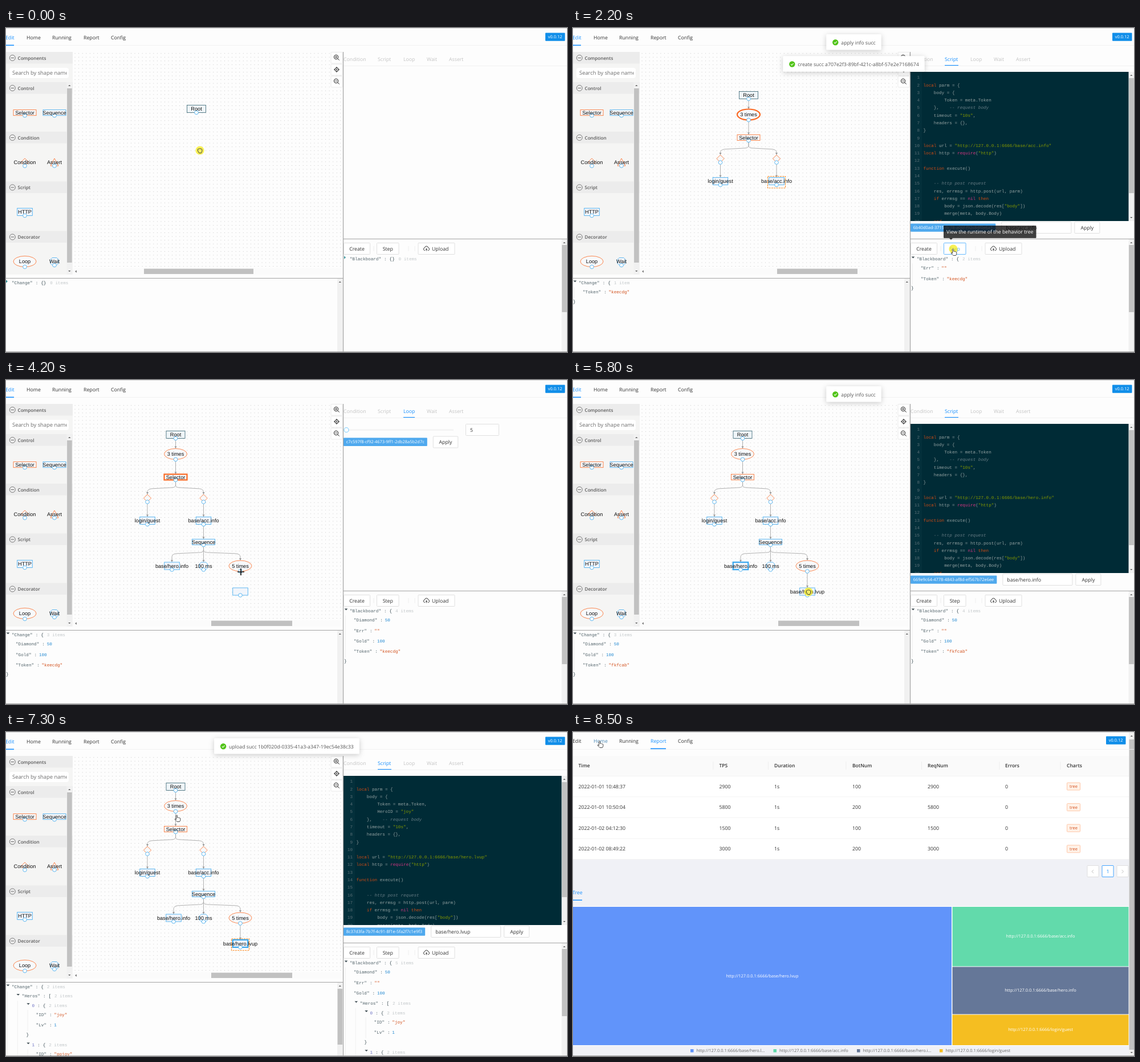
Recreate the animation shown at these times as an HTML page. Size 984 by 569 pixels, loop 9500 ms.

```html
<!DOCTYPE html>
<html lang="en">
<head>
<meta charset="utf-8">
<title>Behavior tree editor</title>
<style>
html, body { margin: 0; width: 100%; height: 100%; overflow: hidden; background: #fdfdfd; }
#stage { display: block; width: 984px; height: 569px; fill: #333; font: 8.75px 'Open Sans', 'Noto Sans', sans-serif; text-rendering: geometricPrecision; }
text { white-space: pre; }
.mono { font: 7.65px 'Liberation Mono', monospace; }
.node { font: 9.2px 'Liberation Sans', sans-serif; text-anchor: middle; fill: #111; }
.mid { text-anchor: middle; }
.small { font-size: 7.45px; }
.head { font-weight: 600; font-size: 8.5px; }
.side { font-weight: 600; font-size: 8.1px; fill: #5c5c5c; }
</style>
</head>
<body>
<svg id="stage" viewBox="0 0 984 569"></svg>
<script>
const LOOP = 9500, STEP = 100, LAST = 8500;
const BLUE = '#1890ff', SKY = '#3aa7ee', ORANGE = '#fb6a24', GRAY = '#c1c1c1', PALE = '#f1f1f1', EDGE = '#d9d9d9';
const stage = document.getElementById('stage');
const ruler = document.createElement('canvas').getContext('2d');

// Drawing helpers
const tag = (name, attrs, body = '') =>
  `<${name} ${Object.entries(attrs).map(([k, v]) => `${k}="${v}"`).join(' ')}>${body}</${name}>`;
const rect = (x, y, width, height, fill, more) => tag('rect', { x, y, width, height, fill, ...more });
const path = (d, stroke, w = 1, more) => tag('path', { d, fill: 'none', stroke, 'stroke-width': w, ...more });
const solid = (d, fill) => tag('path', { d, fill });
const circle = (cx, cy, r, fill, stroke = 'none', w = 1) => tag('circle', { cx, cy, r, fill, stroke, 'stroke-width': w });
const text = (x, y, body, more) => tag('text', { x, y, dy: '.35em', ...more }, body);
const clip = (x, y, width, height, body) => tag('svg', { x, y, width, height, viewBox: `${x} ${y} ${width} ${height}` }, body);
const box = (x, y, w, h, stroke = EDGE, fill = '#fff') => rect(x + .5, y + .5, w - 1, h - 1, fill, { stroke, 'stroke-width': .8, rx: 1 });
const button = (x, y, w, label, hot) =>
  box(x, y, w, 21, hot ? '#40a9ff' : EDGE) + text(x + w / 2, y + 10.5, label, { class: 'mid', fill: hot ? '#40a9ff' : '#333' });
const measure = (s, size) => {
  ruler.font = `${size}px 'Open Sans', 'Noto Sans', sans-serif`;
  return ruler.measureText(s).width;
};
const triangle = (x, y, dir, r = 2.2, fill = '#555') => {
  const turn = { up: 0, right: 90, down: 180, left: 270 }[dir];
  return tag('path', { d: `M${-r} ${r / 2}L0 ${-r / 2}L${r} ${r / 2}z`, fill, transform: `translate(${x} ${y}) rotate(${turn})` });
};
const vbar = (x, y, h, from, size, down) =>
  rect(x, y, 9.7, h, PALE) + triangle(x + 4.8, y + 6, 'up') +
  (size ? rect(x + .6, from, 8.6, size, GRAY) : '') + (down ? triangle(x + 4.8, y + h - 6, 'down') : '');

// Behavior tree: [kind, x, y, label, parent, appears at, linked at]
const NODES = {
  root: ['root', 297.5, 96, 'Root', '', 0, 0],
  loop: ['loop', 297.5, 130, '3 times', 'root', 400, 600],
  sel: ['selector', 297.5, 170.5, 'Selector', 'loop', 800, 900],
  c1: ['condition', 248, 207.5, '', 'sel', 1000, 1100],
  c2: ['condition', 346.5, 207.5, '', 'sel', 1100, 1200],
  login: ['http', 248, 247, 'login/guest', 'c1', 1300, 1500],
  acc: ['http', 346.5, 247, 'base/acc.info', 'c2', 1600, 1800],
  seq: ['sequence', 346.5, 284.5, 'Sequence', 'acc', 3200, 3300],
  hero: ['http', 291, 326.5, 'base/hero.info', 'seq', 3400, 3500],
  wait: ['wait', 346.5, 326.5, '100 ms', 'seq', 3600, 3700],
  again: ['loop', 411, 326.5, '5 times', 'seq', 3800, 3900],
  lvup: ['http', 411, 371.5, 'base/hero.lvup', 'again', 4200, 4300]
};
const HALF = { root: 6.5, loop: 9.5, selector: 5, sequence: 5, condition: 6.6, assert: 6.5, http: 6.5, wait: 6.5 };

function shape(kind, x, y, weight = .8) {
  const h = HALF[kind];
  const look = (color, fill = '#f7f9fc') => ({ fill, stroke: color, 'stroke-width': weight });
  const bar = (w, color, fill) => tag('rect', { x: x - w / 2, y: y - h, width: w, height: 2 * h, ...look(color, fill) });
  const poly = (d, color) => tag('path', { d: `M${x} ${y}${d}z`, ...look(color) });
  const body = {
    root: () => bar(33, '#32606f', '#eff5f8'),
    loop: () => tag('ellipse', { cx: x, cy: y, rx: 20, ry: h, ...look(ORANGE) }),
    selector: () => bar(40, ORANGE),
    sequence: () => bar(40, SKY),
    http: () => bar(26.5, SKY, '#f1f5fb'),
    condition: () => poly('m0-6.6l6.600 6.600l-6.600 6.600l-6.600-6.600', ORANGE),
    assert: () => poly('m0-6.5l7 13h-14', ORANGE),
    wait: () => poly('m-4-6.5h8l3 3v7l-3 3h-8l-3-3v-7', SKY)
  }[kind]();
  return body + circle(x, y + h, 3.3, '#fff', SKY, .8);
}

function link(a, b) {
  const [x, y] = [a[1], a[2] + HALF[a[0]] + 3.4], [u, v] = [b[1], b[2] - HALF[b[0]]];
  const head = solid(`M${u} ${v}l-2-4h4z`, '#999');
  if (x === u) return path(`M${x} ${y}V${v - 2}`, '#a8a8a8', .9) + head;
  const side = Math.sign(u - x), bend = y + 10;
  return path(`M${x} ${y}V${bend - 5}Q${x} ${bend} ${x + 6 * side} ${bend}L${u - 7 * side} ${bend + 2}Q${u} ${bend + 3} ${u} ${bend + 8}V${v - 2}`, '#a8a8a8', .9) + head;
}

function graph(t, s) {
  const live = Object.entries(NODES).filter(([, n]) => t >= n[5])
    .map(([id, n]) => [id, id === 'hero' && t >= 5000 ? n.with(1, 294) : n]);
  const edges = live.filter(([, n]) => n[4] && t >= n[6]).map(([, n]) => link(NODES[n[4]], n)).join('');
  const nodes = live.map(([id, n]) => {
    const [kind, x, y, label, , , done] = n;
    return shape(kind, x, y, s.hot === id ? 2.2 : .8) +
      (t >= done ? text(x, y, label, { class: 'node' }) : '') +
      (s.sel === id ? path(`M${x - 15.5} ${y - 8.5}h31v20.500h-31z`, '#fb8d28', 1.2, { 'stroke-dasharray': '3 1.3' }) : '');
  }).join('');
  return tag('g', { transform: `translate(${s.pan})` }, edges + nodes);
}

// Collapsible JSON view
function json(x, y, title, data) {
  const W = 4.59, IN = 17.8, TALL = 18.3;
  let out = '';
  const put = (px, s, fill, more) => { out += text(px, y, s, { class: 'mono', fill, ...more }); };
  const walk = (key, val, depth) => {
    const nested = typeof val === 'object', left = x + depth * IN + (nested ? 10 : -.8);
    const name = Number.isInteger(key) ? `${key}` : `"${key}"`, end = left + name.length * W;
    put(left, name, Number.isInteger(key) ? '#6c71c4' : '#52636a');
    put(end + 5, ':', '#52636a');
    if (!nested) {
      put(end + 13.4, typeof val === 'string' ? `"${val}"` : val, typeof val === 'string' ? '#d2521e' : '#268bd2');
      y += TALL;
      return;
    }
    const keys = Object.keys(val), list = Array.isArray(val), count = keys.length;
    put(end + 14.5, count ? '{['[+list] : '{}', '#2d4148');
    put(end + (count ? 25 : 30.5), `${count} item${count === 1 ? '' : 's'}`, '#c3c8ca', { 'font-style': 'italic' });
    out += triangle(x + depth * IN + (count ? 3.5 : 1.5), y - 2.5, count ? 'down' : 'right', 2.8, count ? '#3c4a50' : '#2a8b93');
    if (!count) return;
    const top = y + 8;
    y += TALL - 2;
    keys.forEach(k => walk(list ? +k : k, val[k], depth + 1));
    y -= 2;
    out += path(`M${x + depth * IN + 2.5} ${top}V${y - 6}`, '#eee', .8);
    put(x + depth * IN, '}]'[+list], '#2d4148');
    y += TALL;
  };
  walk(title, data, 0);
  return out;
}

// Script panel
const INK = ['#657b83', '#859900', '#cb4b16', '#d33682'];
const paint = line => line.replace(/(--.*)|("[^"]*")|\b(local|function|if|then|end)\b|\b(require|nil)\b/g, (m, ...g) => {
  const i = g.findIndex((v, n) => n < 4 && v);
  return `<tspan fill="${INK[i]}"${i ? '' : ' font-style="italic"'}>${m}</tspan>`;
});
const script = route => ['', 'local parm = {', '    body = {',
  ...(route.endsWith('lvup') ? ['        Token = meta.Token,', '        HeroID = "joy"'] : ['        Token = meta.Token']),
  '    },    -- request body', '    timeout = "10s",', '    headers = {},', '}', '',
  `local url = "http://127.0.0.1:6666/${route}"`, 'local http = require("http")', '', 'function execute()', '',
  '    -- http post request', '    res, errmsg = http.post(url, parm)', '    if errmsg == nil then',
  '        body = json.decode(res["body"])', '        merge(meta, body.Body)', '    end'];

const idTag = (y, id) => {
  const w = measure(id, 7.45) + 9.8;
  return [592 + w, rect(592, y, w, 14.3, '#4fa9ee', { rx: 1 }) + text(596.7, y + 7.2, id, { class: 'small', fill: '#fff' })];
};

function editor(s) {
  const rows = script(s.route).slice(0, 20).map((line, i) => {
    const y = 86.7 + i * 13.28;
    return text(608, y, i + 1, { class: 'mono', fill: '#586e75', 'text-anchor': 'end' }) +
      text(614.5, y, paint(line), { class: 'mono', fill: '#93a1a1' });
  }).join('');
  const [end, label] = idTag(343.5, s.id);
  return vbar(974.5, 77, 262, 88, 202, true) +
    clip(592, 77, 382.5, 262, rect(592, 77, 383, 262, '#002b36') + rect(592, 77, 20, 262, '#04303b') + rows) + label +
    box(end + 10, 340, 123, 21) + text(end + 18, 350.5, s.route) + button(end + 138, 340, 45, 'Apply');
}

function slider(s) {
  const [end, label] = idTag(101.6, s.id);
  return rect(597, 86.5, 188, 2.5, '#f3f3f3') + circle(597, 87.7, 4, '#fff', '#91d5ff', 1.3) +
    box(806, 77, 59, 21) + text(814, 88, s.value) + label + button(end + 10, 98.5, 44.5, 'Apply');
}

// Page frame
const NAV = { Edit: [-1, 15], Home: [36, 24], Running: [81, 34], Report: [136, 27], Config: [184, 27] };
function header(s, up = 0, badge = 946) {
  const [ix, iw] = s.ink || NAV[s.page];
  return rect(0, 0, 984, 1, '#dcdcdc') + rect(0, 30, 984, .8, '#f0f0f0') +
    Object.entries(NAV).map(([name, [x]]) =>
      text(x, 16.5 - up, name, { fill: name === s.page ? BLUE : name === s.warm ? '#4787b5' : '#333' })).join('') +
    rect(ix, 29.5 - up, iw, 1.6, BLUE) + rect(badge, 8.6 - up, 34.5, 14.2, '#108ee9', { rx: 1 }) +
    text(badge + 17.2, 15.8 - up, 'v0.0.12', { class: 'mid small', fill: '#fff' });
}

function sidebar() {
  const bars = [['Components', 42], ['Control', 95], ['Condition', 182], ['Script', 269.5], ['Decorator', 356.5]];
  const items = [['selector', 33, 148.7, 'Selector'], ['sequence', 85, 148.7, 'Sequence'], ['condition', 33, 235.5, 'Condition'],
    ['assert', 85, 235.5, 'Assert'], ['http', 33, 323, 'HTTP'], ['loop', 33, 410, 'Loop'], ['wait', 85, 410, 'Wait']];
  return rect(0, 42, 117, 391, '#f5f5f4') +
    bars.map(([name, y]) => rect(0, y, 117, 20.5, '#ececec') + circle(11.3, y + 10.5, 5, 'none', '#6b6b6b', .9) +
      path(`M8.5 ${y + 10.5}h5.6`, '#6b6b6b') + text(20.5, y + 11, name, { class: 'side' })).join('') +
    rect(6, 70, 104, 18, '#fff', { rx: 4 }) +
    clip(6, 70, 100.5, 18, text(11, 79, 'Search by shape name', { fill: '#6d6d6d', 'font-size': 9.4 })) +
    items.map(([kind, x, y, label]) => shape(kind, x, y) + text(x, y, label, { class: 'node' })).join('') +
    vbar(106.5, 95, 338, 106, 306, true);
}

const zoom = y => circle(579, y - 1, 3.7, 'none', '#222') + path(`M581.7 ${y + 1.7}l3 3M577.2 ${y - 1}h3.6`, '#222');
const cloud = (x, y, dir) => path(`M${x - 2} ${y + 3}h-1a2.2 2.2 0 0 1 0-4.4a3 3 0 0 1 6 0a2.2 2.2 0 0 1 0 4.4h-1M${x} ${y + 4}v-4m-1.5 ${dir > 0 ? 1.5 : 2.5}l1.5 ${-1.5 * dir}l1.5 ${1.5 * dir}`, '#333', .9);

function editPage(t, s) {
  const tabs = { Condition: [592, 39], Script: [652, 24], Loop: [697, 20], Wait: [738, 18], Assert: [777, 25] };
  const grid = tag('pattern', { id: 'dots', x: 120.6, y: 44.2, width: 6.56, height: 6.56, patternUnits: 'userSpaceOnUse' }, rect(0, 0, .9, .9, '#bdbdbd'));
  const scrolls = Boolean(s.change.Heros);
  return grid + rect(117, 42, 474, 380, 'url(#dots)') + clip(117, 42, 474, 380, graph(t, s)) + sidebar() +
    rect(117, 422, 474, 11, '#fbfbfb') + triangle(122.5, 427.5, 'left') + rect(s.thumb[0], 422.7, s.thumb[1], 9.3, GRAY) +
    [42, 63, 84].map(y => box(569.5, y, 21.5, 20.5, '#e6e6e6')).join('') + zoom(52) + path('M579 49.2v3.6', '#222') + zoom(94) +
    circle(580, 73, 3.2, 'none', '#222') + circle(580, 73, 1.1, '#222') + path('M580 68v3M580 75v3M575 73h3M582 73h3', '#222') +
    Object.entries(tabs).map(([name, [x, w]]) => text(x, 55, name, { fill: name === s.tab ? BLUE : '#c4c4c4' }) +
      (name === s.tab ? rect(x, 65, w, 1.6, BLUE) : '')).join('') + rect(592, 66, 392, .8, '#f0f0f0') +
    (s.tab === 'Script' ? editor(s) : s.tab ? slider(s) : '') +
    button(592, 377, 47, 'Create', s.over === 'Create') + button(650, 377, 39.5, 'Step', s.over === 'Step') +
    path('M645 383v9M706 383v9M717 383v9', '#eee') + box(722.5, 377, 65, 21, s.over === 'Upload' ? '#40a9ff' : EDGE) +
    cloud(737.5, 387.5, 1) + text(747, 387.5, 'Upload') +
    json(593, 405.5, 'Blackboard', s.board) + json(0, 447.5, 'Change', s.change) +
    vbar(974.5, 371, 198, 381, 118) + vbar(581, 440, 129, 451, scrolls ? 98 : 0) +
    path('M591.5 42V569M592 370.5H984M0 439.5H591', '#a3a3a3', 1.2) + header(s) +
    (s.over === 'Step' ? rect(650, 347, 162.5, 22, 'rgba(0,0,0,.75)', { rx: 1 }) + solid('M660 369h6l-3 3z', 'rgba(0,0,0,.75)') +
      text(655, 358, 'View the runtime of the behavior tree', { fill: '#fff' }) : '');
}

const columns = (y, cells, cls) => cells.map(([x, label]) => text(x, y, label, { class: cls })).join('');
const dividers = (xs, y) => xs.map(x => rect(x, y, .8, 14, '#ececec')).join('');

function homePage(s) {
  const inbox = 'M481.5 68.5L484.5 58.5H500L503 68.5V79.5H481.5zM481.5 68.5H487.5Q488.5 72 492.3 72T497 68.5H503';
  return rect(0, 41.5, 984, 86, '#fafafa') + path('M0 41.5H984', '#e3e3e3', .8, { 'stroke-dasharray': '2 1.5' }) +
    path(inbox, '#40a9ff', 2) +
    text(492.5, 106, 'Click or drag file (*.xml) to this area to upload', { class: 'mid', 'font-size': 9.93 }) +
    box(-2, 127.5, 248, 21.5) + text(7, 139, 'Filter by tags', { fill: '#bfbfbf' }) +
    [[492, 52], [548.5, 56], [609.5, 62], [676, 77]].map(([x, w]) => box(x, 127.5, w, 21.5)).join('') +
    columns(138.5, [[517, 'Run'], [574, 'Load'], [634.5, 'Delete'], [701, 'Download']]) +
    circle(507.5, 138.5, 4.2, 'none', '#333', .9) + solid('M506.3 136.5l3 2l-3 2z', '#333') + cloud(564, 138.5, -1) +
    path('M620.5 136h8M623 136v-1.5h3v1.5M621.7 136l.5 6.5h4.6l.5-6.5', '#333', .9) +
    path('M691 134.5v5.5m-2-2l2 2l2-2M687 142.5h8', '#333', .9) +
    rect(0, 150, 984, 34, '#fafafa') + rect(0, 184, 984, .8, '#eee') + box(4, 161.5, 11, 11, EDGE, '#f5f5f5') +
    columns(167, [[30.5, 'Bot behavior file'], [261.5, 'Tags'], [363, 'UpdateTime'], [548, 'Number of runs'], [772, 'Status'], [891.5, 'Desc']], 'head') +
    dividers([250.5, 352, 537, 761, 880.5], 160) +
    tag('ellipse', { cx: 492.5, cy: 238, rx: 20, ry: 4.5, fill: '#f5f5f5' }) +
    path('M477 226L482 216.5H503L508 226V239.5H477zM477 226H486Q487 230 492.5 230T499 226H508', EDGE, 1, { fill: '#fafafa' }) +
    text(492.5, 255, 'No Data', { class: 'mid', fill: '#c4c4c4' }) + rect(0, 294, 984, .8, '#f0f0f0') + header(s);
}

function reportPage(s) {
  const xs = [9.5, 256.5, 353, 490, 622, 758, 866], url = 'http://127.0.0.1:6666/';
  const rows = [['2022-01-01 10:48:37', 100, 2900], ['2022-01-01 10:50:04', 200, 5800], ['2022-01-02 04:12:30', 100, 1500], ['2022-01-02 08:49:22', 200, 3000]];
  const line = cells => cells.map((c, i) => [xs[i], c]);
  const table = rows.map(([when, bots, reqs], i) => {
    const y = 95.5 + i * 36.6;
    return columns(y, line([when, reqs, '1s', bots, reqs, 0])) + rect(0, y + 18, 975, .8, '#f0f0f0') +
      box(866, y - 7, 24, 14, '#ffbb96', '#fff2e8') + text(878, y, 'tree', { class: 'mid small', fill: '#d4511f' });
  }).join('');
  const cells = [[0, 307, 664, 243, '#6194fa', 'base/hero.lvup', 332, 206, 'base/hero.l...'], [665.5, 307, 309, 104.5, '#62daab', 'base/acc.info', 820, 351.5],
    [665.5, 412.5, 309, 83, '#657798', 'base/hero.info', 820, 498, 'base/hero.i...'], [665.5, 496.5, 309, 53.5, '#f5be21', 'login/guest', 820, 643]];
  const chart = cells.map(([x, y, w, h, fill, name, cx, key, short = name]) =>
    rect(x, y, w, h, fill) + text(cx, y + h / 2 - .5, url + name, { class: 'mid small', fill: '#fff' }) +
    rect(key, 557, 5.5, 5.5, fill) + text(key + 10.5, 559.7, url + short, { class: 'small', fill: '#666' })).join('');
  const pager = [[901.5, EDGE, 'M913 242l-3 3l3 3'], [927.5, BLUE, ''], [953.5, EDGE, 'M962.5 242l3 3l-3 3']]
    .map(([x, c, d]) => box(x, 234, 21, 21, c) + path(d, '#bbb', .9)).join('');
  return rect(0, 42, 984, 182, '#fff') + rect(0, 42, 984, 35, '#fafafa') + rect(0, 77, 984, .8, '#f0f0f0') +
    columns(59, line(['Time', 'TPS', 'Duration', 'BotNum', 'ReqNum', 'Errors', 'Charts']), 'head') +
    dividers([245.5, 342, 478.5, 611, 747.5, 854.5], 52) + table + rect(0, 224, 984, 345, '#f0f1f6') + pager +
    text(938, 244.8, '1', { class: 'mid', fill: BLUE }) + text(-1, 282, 'Tree', { fill: BLUE }) + rect(0, 294.5, 16, 1.5, BLUE) +
    (s.chart ? rect(0, 306, 975, 245, '#fff') + chart + vbar(975, 1, 568, 13, 545, true) : '') +
    header(s, 1, s.chart ? 935 : 946);
}

const toast = (message, i) => {
  const w = measure(message, 8.75) + 36, x = 492.5 - w / 2, y = 11 + i * 38.3;
  return rect(x, y, w, 27.5, '#fff', { rx: 1.5, style: 'filter:drop-shadow(0 2px 5px rgba(0,0,0,.2))' }) +
    circle(x + 16, y + 14.2, 5.2, '#52c41a') + path(`M${x + 13.7} ${y + 14.3}l1.7 1.7l3-3.3`, '#fff', 1.1) +
    text(x + 26, y + 14.5, message, { fill: '#555' });
};

function pointer(t) {
  const i = CURSOR.findLastIndex(c => c[0] <= t), a = CURSOR[i], b = CURSOR[i + 1] || a;
  const k = b === a ? 0 : (t - a[0]) / (b[0] - a[0]);
  const x = a[1] + (b[1] - a[1]) * k, y = a[2] + (b[2] - a[2]) * k;
  const art = {
    hand: path('M-1.5 4V-3.5q1-1.5 2 0V.5q1-1 2 .2q1-.7 1.8 .4q1.2-.4 1.5 .8V5L4.5 7.5H0L-3.5 4q-.8-1.5 .6-1.5z', '#222', .8, { fill: '#fff' }),
    grab: path('M-3.5 1V-2q.8-1.5 1.8-.6q.8-1.5 1.8-.3q1-1 1.9 .3q1.4-.5 1.8 1V1.5L2.5 4.5H-1.5z', '#333', .9, { fill: '#f4ec66' }),
    cross: path('M-6 0H6M0-6V6', '#111', 1.7)
  }[a[3]];
  return tag('g', { transform: `translate(${x} ${y})` }, (a[4] ? circle(0, a[3] === 'hand' ? -4 : 0, 7.6, 'rgba(247,236,20,.72)') : '') + art);
}

// Timeline: cursor path, then state changes
const CURSOR = [
  [0, 340, 215, 'grab', 1], [300, 314, 191, 'grab', 1], [400, 308, 152, 'grab', 1], [500, 308, 126, 'cross'], [600, 775, 109, 'hand', 1],
  [800, 308, 193, 'grab', 1], [900, 308, 163, 'cross'], [1000, 259, 230, 'grab', 1], [1100, 358, 230, 'grab', 1], [1300, 259, 269, 'grab', 1],
  [1500, 905, 352, 'hand', 1], [1600, 358, 269, 'grab', 1], [1800, 358, 269, 'hand', 1], [1900, 906, 354, 'hand', 1], [2100, 618, 391, 'hand', 1],
  [2200, 667, 392, 'hand', 1], [3000, 667, 392, 'hand', 1], [3100, 460, 330, 'grab', 1], [3200, 347, 285, 'grab', 1], [3400, 291, 326, 'grab', 1],
  [3600, 347, 326, 'grab', 1], [3800, 411, 326, 'grab', 1], [3900, 775, 112, 'hand', 1], [4100, 411, 372, 'grab', 1], [4200, 412, 337, 'cross'],
  [4300, 411, 370, 'cross'], [4400, 618, 391, 'hand', 1], [4600, 664, 393, 'hand', 1], [5000, 664, 393, 'hand', 1], [5200, 411, 372, 'hand', 1],
  [5500, 905, 354, 'hand', 1], [5700, 294, 327, 'grab', 1], [5800, 413, 372, 'grab', 1], [6000, 720, 146, 'hand'], [6200, 903, 354, 'hand', 1],
  [6500, 618, 391, 'hand', 1], [6700, 661, 396, 'hand', 1], [7000, 661, 396, 'hand', 1], [7200, 757, 391, 'hand', 1], [7300, 300, 150, 'hand'],
  [7400, 56, 26, 'hand'], [7800, 56, 26, 'hand'], [8000, 150, 21, 'hand', 1], [8200, 878, 98, 'hand', 1], [8500, 47, 20, 'hand']
];
const GUEST = '41ad93e0-27cb-4b0e-9c58-b1f07d36a2e4', ACC = '6b40d0ad-3715-4c78-a06f-f92c84f0e6a1';
const HERO = '669e9c64-4778-4843-af8d-ef567b72e6ee', LVUP = '8c37d3fa-7b7f-4c91-8f1e-5fa2f7c1e9f3';
const AGAIN = 'c7c597f8-cf92-4673-9ff1-2db28a5b2d7c';
const APPLIED = 'apply info succ', CREATED = 'create succ a707e2f3-89bf-421c-a8bf-57e2e7168674';
const RETRIED = 'create succ febde5a2-8724-4869-8464-cb2cab53df8f', SENT = 'upload succ 1b0f020d-0335-41a3-a347-19ec54e38c33';
const wealth = Token => ({ change: { Diamond: 50, Gold: 100, Token }, board: { Diamond: 50, Err: '', Gold: 100, Token } });
const login = Token => ({ change: { Token }, board: { Err: '', Token } });
const Heros = [{ ID: 'joy', Lv: 1 }, { ID: 'pojoy', Lv: 1 }];
const STEPS = [
  [0, { page: 'Edit', pan: [36.5, 46], thumb: [242, 192], toasts: [], tab: '', board: {}, change: {} }],
  [100, { pan: [28, 38] }], [200, { pan: [19, 30] }], [300, { pan: [10.5, 22], thumb: [330, 168] }],
  [600, { tab: 'Loop', id: 'f20c81b4-6e97-4d35-b14a-08c3ad92e75f', value: 3, thumb: [358, 141] }], [700, { toasts: [APPLIED] }], [1000, { toasts: [] }],
  [1400, { tab: 'Script', route: 'login/guest', id: GUEST, sel: 'login' }], [1500, { toasts: [APPLIED] }],
  [1800, { route: 'base/acc.info', id: ACC, sel: 'acc' }], [1900, { toasts: [APPLIED] }],
  [2100, { toasts: [APPLIED, CREATED], over: 'Create', hot: 'login' }], [2200, { over: 'Step', hot: 'loop', ...login('keecdg') }],
  [2300, { hot: 'sel', toasts: [CREATED] }], [2400, { hot: 'c2' }], [2500, { hot: 'acc', toasts: [] }],
  [2600, { hot: 'loop', ...wealth('keecdg') }], [2800, { hot: 'sel' }],
  [3100, { over: '', sel: '', pan: [0, 0], thumb: [360, 142] }], [3500, { route: 'base/hero.info', id: HERO }],
  [3900, { tab: 'Loop', id: AGAIN, value: 5 }], [4000, { toasts: [APPLIED] }], [4100, { toasts: [] }],
  [4400, { over: 'Create', toasts: [RETRIED] }], [4600, { over: 'Step', hot: 'login', ...login('fkfcab') }],
  [4800, { hot: 'acc', toasts: [], ...wealth('fkfcab') }], [5000, { hot: 'hero' }],
  [5200, { over: '', tab: 'Script', route: 'base/hero.lvup', id: LVUP }], [5500, { toasts: [APPLIED] }],
  [5700, { route: 'base/hero.info', id: HERO }], [5900, { route: 'base/hero.lvup', id: LVUP, sel: 'lvup' }], [6000, { toasts: [] }],
  [6200, { toasts: [APPLIED] }], [6500, { over: 'Create', toasts: [RETRIED] }],
  [6700, { over: 'Step', hot: 'wait', change: { Heros, Token: 'fkfcab' }, board: { Diamond: 50, Err: '', Gold: 100, Heros, Token: 'fkfcab' } }],
  [6900, { hot: 'again' }], [7000, { hot: 'lvup', toasts: [] }], [7100, { over: 'Upload' }], [7200, { toasts: [SENT] }], [7300, { over: '' }],
  [7500, { page: 'Home', ink: [11, 19] }], [7600, { ink: null }], [7900, { toasts: [] }],
  [8100, { page: 'Report' }], [8200, { chart: true }], [8500, { warm: 'Home' }]
];

let shown = -1;
function draw() {
  const t = Math.min(LAST, Math.floor((performance.now() - start) % LOOP / STEP) * STEP);
  if (t !== shown) {
    const s = Object.assign({}, ...STEPS.filter(([at]) => at <= t).map(([, change]) => change));
    const page = { Edit: () => editPage(t, s), Home: () => homePage(s), Report: () => reportPage(s) }[s.page]();
    stage.innerHTML = rect(0, 0, 984, 569, '#fdfdfd') + page + rect(0, 568, 984, 1, '#a6a6a6') + s.toasts.map(toast).join('') + pointer(t);
    shown = t;
  }
  requestAnimationFrame(draw);
}
const start = performance.now();
draw();
</script>
</body>
</html>
```
